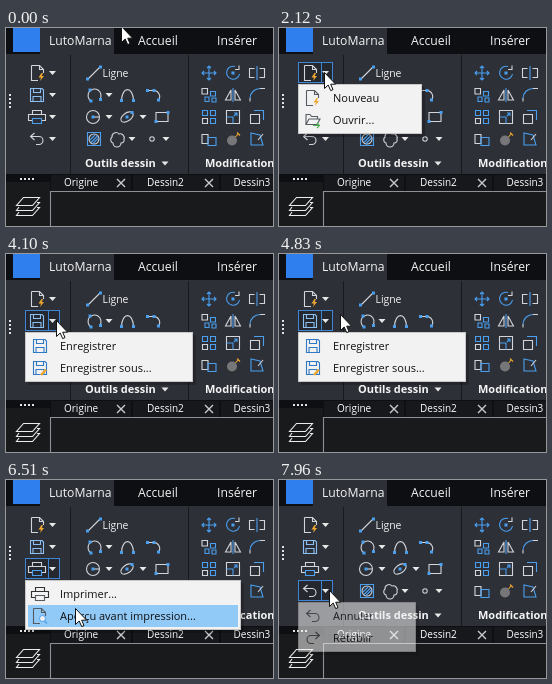
Recreate the animation shown at these times as an HTML page. Size 267 by 198 pixels, loop 7.99 s.

```html
<!DOCTYPE html>
<html lang="fr">
<head>
<meta charset="utf-8">
<style>
  html, body { margin: 0; height: 100%; overflow: hidden; background: #2d3037; }
  svg { display: block; width: 100vw; height: 100vh; }
  text { font: 11px "Open Sans", "Noto Sans", sans-serif; fill: #f4f4f4; }
  .top { font-size: 12.2px; font-weight: 500; }
  .bold { font-weight: 700; }
  .small { font-size: 10.4px; }
  .doc { font-size: 10px; fill: #fff; }
  .menu text { fill: #111; }
  path, .ring { fill: none; stroke-width: 1.1; }
</style>
</head>
<body>
<svg viewBox="0 0 267 198">
  <g id="base"></g>
  <g id="buttons"></g>
  <g id="icons"></g>
  <g id="menus"></g>
  <path id="cursor" d="M.5 .5V16.5L4.2 13L6.7 18.6L9 17.6L6.7 12.2H11.6Z" style="fill:#fff;stroke:#111;stroke-width:1"/>
</svg>
<script>
const $ = id => document.getElementById(id);
const WHITE = '#d2d5da', BLUE = '#4a9ff0', GREY = '#555b63', AMBER = '#f0a830';

const rect = (x, y, w, h, fill, more = '') =>
  `<rect x="${x}" y="${y}" width="${w}" height="${h}" fill="${fill}" ${more}/>`;
const line = (d, color = WHITE, more = '') => `<path d="${d}" stroke="${color}" ${more}/>`;
const ring = (r, color = WHITE) => `<circle r="${r}" class="ring" stroke="${color}"/>`;
const text = (x, y, s, cls = '') => `<text x="${x}" y="${y}" class="${cls}">${s}</text>`;
const at = (x, y, s) => `<g transform="translate(${x} ${y})">${s}</g>`;
const dots = (...p) => p.map(([x, y]) => rect(x - 1.5, y - 1.5, 3, 3, BLUE)).join('');
const arrow = (x, y) => `<path d="M${x - 3.5} ${y - 2}h7l-3.5 4z" style="fill:#e8e8e8"/>`;

// Icons are centred on 0,0
const page = c => line('M-6.5 -7.5H1.5L5.5 -3.5V0M-6.5 -7.5V7.5H0M1.5 -7.5V-3.5H5.5', c);
const bolt = `<path d="M3.5 0L.5 4.5H3L2 8L6 3H3.7L5 0Z" style="fill:${AMBER}"/>`;
const floppy = c => line('M-6.5 -6.5H5L6.5 -5V6.5H-6.5ZM-3.5 -6.5V-2.5H3.5V-6.5M-4 6.5V1.5H4V6.5', c);
const printer = (c, c2) =>
  line('M-4.5 3.5H-8.5V-2.5H8.5V3.5H4.5M-4.5 -2.5V-6.5H4.5V-2.5', c) + line('M-4.5 1.5H4.5V6.5H-4.5Z', c2);
const undo = c => line('M-2.5 -6L-6.5 -2.5L-2.5 1M-6.5 -2.5H2A4 4 0 0 1 2 5.5H-1', c);
const redo = c => `<g transform="scale(-1 1)">${undo(c)}</g>`;
const folder = line('M-7 4.5V-5.5H-3L-1.5 -3.5H4.5V-1M-7 4.5L-4 -1H7L4 4.5Z', GREY) +
  line('M0 5.5H6M4 3L6.5 5.5L4 8', '#4caf50');
const pencil = line('M1 7L6 1.5', AMBER, 'style="stroke-width:2.5"');
const lens = `<circle cx="2.5" cy="2.5" r="3" fill="#f2f2f2" stroke="${BLUE}"/>` + line('M4.5 5L7 7.5', BLUE);

$('base').innerHTML =
  rect(0, 0, 267, 26, '#0d0f12') + rect(34, 0, 74, 27, '#2d3037') + rect(7, 0, 27, 24, '#2f80ee') +
  text(43, 17, 'LutoMarna', 'top') + text(132, 17, 'Accueil', 'top') + text(211, 17, 'Insérer', 'top') +
  [67, 71, 75, 79].map(y => rect(3, y - 1, 2, 2, '#e4e4e4')).join('') +
  rect(64, 27, 1, 119, '#17191d') + rect(182, 27, 1, 119, '#17191d') +
  rect(0, 146, 267, 17, '#0d0f12') + rect(0, 154, 267, 44, '#191a1c') + rect(44, 154, 223, 9, '#0d0f12') +
  [14, 18, 22, 26].map(x => rect(x, 150, 2, 2, '#e4e4e4')).join('') +
  rect(45, 147, 80, 16, '#16181c') + rect(127, 147, 86, 16, '#16181c') + rect(215, 147, 52, 16, '#16181c') +
  line('M44.5 198V163.5H267', '#8d9096') +
  text(58, 158, 'Origine', 'doc') + text(141, 158, 'Dessin2', 'doc') + text(227.5, 158, 'Dessin3', 'doc') +
  [115, 203].map(x => line(`M${x - 4} 151l8 8m0 -8l-8 8`, '#c8cacd', 'style="stroke-width:1.4"')).join('') +
  line('M17.5 169.5H33.5L26.5 177.5H10.5ZM13 179L10.5 182.5H26.5L33.5 174.5H31M13 184L10.5 187.5H26.5L33.5 179.5H31', '#ececec');

const drawTools =
  at(88, 45, line('M-6 6L6 -6') + dots([-6.5, 6], [6.5, -6])) + text(96.5, 49, 'Ligne', 'small') +
  at(88, 67, line('M-3 6A6.5 6.5 0 1 1 6 4') + dots([-3, 6], [-4, -5], [6.5, 4.5])) + arrow(103, 67) +
  at(121.5, 67, line('M-6 5.5C-5.5 -9 5.5 -9 6 5.5') + dots([-6, 5.5], [6, 5.5])) +
  at(147, 67, line('M-5.5 -4.5H0A6 6 0 0 1 5.5 5') + dots([-5.5, -4.5], [1, -4.5], [5.5, 5])) +
  at(87, 89, ring(6.5) + line('M0 0H6') + dots([0, 0])) + arrow(103, 89) +
  at(121, 89, '<ellipse rx="7" ry="4" transform="rotate(-35)" class="ring" stroke="#d2d5da"/>' +
    dots([0, 0], [5, -4.5])) + arrow(137, 89) +
  at(156, 89, line('M-6 -4.5H6V4.5H-6Z') + dots([-6, 4.5], [6, -4.5])) +
  at(88, 111, line('M-6.5 -6.5H6.5V6.5H-6.5Z', BLUE) + ring(5) +
    line('M-4 1L1 -4M-3 3.5L3.5 -3M-1 4.5L4.5 -1', BLUE)) +
  at(112, 111, line('M-5 4A3.5 3.5 0 0 1 -6 -2A4 4 0 0 1 1 -5A4 4 0 0 1 6 0A3 3 0 0 1 3 4A4 4 0 0 1 -5 4Z')) +
  arrow(126, 111) + at(146, 111, ring(2.2)) + arrow(160, 111) +
  text(79, 139, 'Outils dessin', 'bold') + arrow(159, 135.5);

// Three columns of editing tools, row by row
const editIcons = [
  line('M0 -7V7M-7 0H7M-2 -5L0 -7L2 -5M-2 5L0 7L2 5M-5 -2L-7 0L-5 2M5 -2L7 0L5 2', BLUE),
  line('M2 -6.5A6.5 6.5 0 1 0 6.5 1', BLUE) + line('M2 -3.5H6V-7.5') + dots([0, 0]),
  line('M-2.5 -4.5H-7.5V4.5H-2.5M2.5 -4.5H7.5V4.5H2.5') + line('M0 -7V7', BLUE),
  line('M-7 -6.5H-1.5V-1H-7Z') + line('M1.5 -3.5H6.5V1H1.5ZM-4 2H0V6.5H-4ZM3 3H7V7H3Z', BLUE),
  line('M-2 -5V5H-7.5ZM2 -5V5H7.5Z') + line('M0 -7V7', BLUE),
  line('M-7 6.5V3M3 -6.5H8') + line('M-7 3A10 10 0 0 1 3 -6.5', BLUE),
  line('M-6.5 -6.5H-1.5V-1.5H-6.5ZM1.5 -6.5H6.5V-1.5H1.5ZM1.5 1.5H6.5V6.5H1.5Z', BLUE) + line('M-6.5 1.5H-1.5V6.5H-6.5Z'),
  line('M-6.5 -6.5H6.5V6.5H-6.5Z') + line('M-6.5 0H0V6.5M1 -1L4 -4M1 -4H4V-1', BLUE),
  line('M-6.5 -2.5H2.5V6.5H-6.5Z') + line('M-3 -6.5H6.5V3', BLUE),
  line('M-7 -4.5H-1V4.5H-7Z') + line('M-1 -1.5H7V6.5H-1Z', BLUE),
  '<circle cx="-1" cy="1.5" r="5" fill="#77777a"/>' + line('M2.5 -2L5 -5M4 -6.5L7 -3.5', AMBER),
  line('M-6 -6L3 -4L6 6H-6Z', BLUE) + line('M1 1L6 -5')
];
const editTools = editIcons.map((icon, i) => at(203 + 24 * (i % 3), 45 + 22 * Math.floor(i / 3), icon)).join('') +
  text(199, 139, 'Modification', 'bold');

$('icons').innerHTML = drawTools + editTools +
  at(32, 45, page(WHITE) + bolt) + at(31, 67, floppy('#8cc0f5')) +
  at(31, 89, printer(WHITE, BLUE)) + at(31, 111, undo(WHITE)) +
  [45, 67, 89, 111].map(y => arrow(46.5, y)).join('');

// Each drop-down: opening time, closing time, width, two items
const menus = [
  { open: 1700, close: 2930, w: 124, items: [['Nouveau', page(GREY) + bolt], ['Ouvrir...', folder]] },
  { open: 3740, close: 4950, w: 168, items: [['Enregistrer', floppy('#2f78c4')], ['Enregistrer sous...', floppy('#2f78c4') + pencil]] },
  { open: 5620, close: 6960, w: 216, items: [['Imprimer...', printer('#333', GREY)], ['Aperçu avant impression...', page(GREY) + lens]] },
  { open: 7860, close: 7990, w: 118, items: [['Annuler', undo(GREY)], ['Rétablir', redo(GREY)]] }
];
menus.forEach((m, i) => {
  const y = 34.5 + 22 * i;
  m.top = 56 + 22 * i;
  $('buttons').innerHTML += `<g>${rect(19.5, y, 23, 20, 'none')}${rect(42.5, y, 11, 20, 'none')}</g>`;
  $('menus').innerHTML += `<g class="menu">` +
    rect(22, m.top + 3, m.w, 50, '#000', 'opacity=".2"') +
    rect(19.5, m.top + .5, m.w - 1, 49, '#f2f2f2', 'stroke="#c8c8c8"') +
    rect(22, 0, m.w - 6, 22, '#91c9f7', 'class="row"') +
    m.items.map(([label, icon], k) => {
      const y = m.top + 14 + 22 * k;
      return at(34, y, icon) + text(54, y + 4, label);
    }).join('') + '</g>';
});
const menuEls = document.querySelectorAll('.menu');
const buttonEls = $('buttons').children;

// Pointer stops: time, x, y
const stops = [
  [0, 115, -2], [840, 115, -2], [1380, 45, 44], [2120, 45, 44], [2520, 62, 92], [2550, 62, 92],
  [2930, 57, 48], [3130, 58, 27], [3610, 50, 66], [4100, 50, 66], [4460, 66, 122], [4520, 66, 122],
  [4890, 61, 55], [4950, 61, 55], [5080, 62, 45], [5500, 47, 97], [5810, 47, 97], [6240, 69, 135],
  [6420, 69, 135], [6900, 66, 63], [7240, 66, 63], [7640, 50, 110], [7990, 50, 110]
];
function pointer(t) {
  const i = stops.findIndex(s => s[0] > t);
  const [t0, x0, y0] = stops[i - 1], [t1, x1, y1] = stops[i];
  const u = (t - t0) / (t1 - t0), e = u * u * (3 - 2 * u);
  return [Math.round(x0 + (x1 - x0) * e), Math.round(y0 + (y1 - y0) * e)];
}

function paint(el, fill, stroke) {
  el.setAttribute('fill', fill);
  el.setAttribute('stroke', stroke);
}

function draw(now) {
  const t = now % 7990, [x, y] = pointer(t);
  $('cursor').setAttribute('transform', `translate(${x} ${y})`);
  menus.forEach((m, i) => {
    const shown = t >= m.open && t < m.close;
    menuEls[i].style.opacity = shown ? Math.min(1, (t - m.open + 10) / 200) : 0;
    const k = Math.floor((y - m.top - 3) / 22);
    const row = menuEls[i].querySelector('.row');
    row.setAttribute('y', m.top + 3 + 22 * k);
    row.style.opacity = k === 0 || k === 1 ? 1 : 0;

    const top = 34 + 22 * i;
    const over = x >= 19 && x < 54 && y >= top && y < top + 21;
    const [main, drop] = buttonEls[i].children;
    const edge = shown ? '#3d86d6' : over ? '#46494f' : 'none';
    paint(main, shown ? '#25282e' : 'none', edge);
    paint(drop, shown ? '#25282e' : edge, edge);
  });
  requestAnimationFrame(draw);
}
requestAnimationFrame(draw);
</script>
</body>
</html>
```
